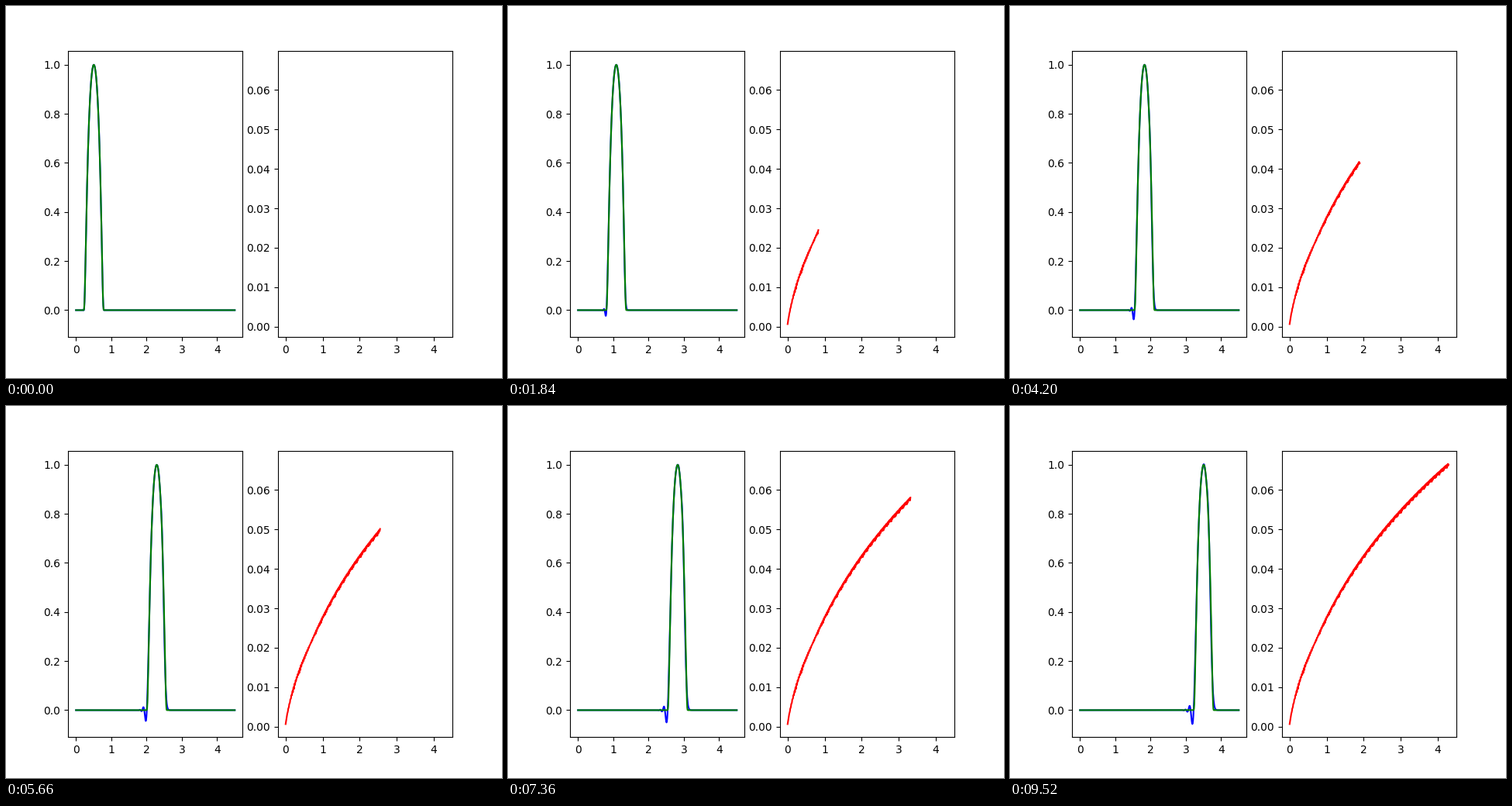
Animation of 640 by 480 pixels, one loop 9.54 s. Source, as a matplotlib script:

```python
import numpy as np
import matplotlib.pyplot as plt
from matplotlib.animation import FuncAnimation

FRAMES, INTERVAL = 477, 20
LENGTH, CELLS, SPEED = 4.5, 500, 0.7
CENTER, RADIUS = 0.5, 0.3

x = np.linspace(0, LENGTH, CELLS + 1)
dx = x[1] - x[0]
dt = dx
cfl = SPEED * dt / dx


def bump(x):
    """Smooth compact pulse with height 1."""
    s = 1 - ((x - CENTER) / RADIUS) ** 2
    inside = s > 1e-3
    return np.where(inside, np.exp(1 - 1 / np.where(inside, s, 1)), 0)


def lax_wendroff(u):
    new = u.copy()
    left, mid, right = u[:-2], u[1:-1], u[2:]
    new[1:-1] = (mid - cfl / 2 * (right - left)
                 + cfl ** 2 / 2 * (right - 2 * mid + left))
    return new


# Advance the scheme once and keep every state
numeric, exact = [], []
u = bump(x)
for n in range(1, FRAMES + 1):
    u = lax_wendroff(u)
    numeric.append(u)
    exact.append(bump(x - SPEED * n * dt))
error = np.abs(np.array(numeric) - np.array(exact)).max(axis=1)
time = np.arange(FRAMES) * dt

fig, (wave_ax, err_ax) = plt.subplots(1, 2, figsize=(6.4, 4.8), dpi=100)


def set_limits(ax, x_range, y_range, margin=0.05):
    for (low, high), setter in ((x_range, ax.set_xlim), (y_range, ax.set_ylim)):
        pad = margin * (high - low)
        setter(low - pad, high + pad)


set_limits(wave_ax, (0, LENGTH), (-0.0567, 1.0045))
set_limits(err_ax, (0, time[-1]), (0.0007, 0.0666))

numeric_line, = wave_ax.plot([], [], color="blue")
exact_line, = wave_ax.plot([], [], color="green")
error_line, = err_ax.plot([], [], color="red")


def update(i):
    numeric_line.set_data(x, numeric[i])
    exact_line.set_data(x, exact[i])
    error_line.set_data(time[:i + 1], error[:i + 1])
    return numeric_line, exact_line, error_line


anim = FuncAnimation(fig, update, frames=FRAMES, interval=INTERVAL,
                     repeat=True, repeat_delay=0)
plt.show()
```
